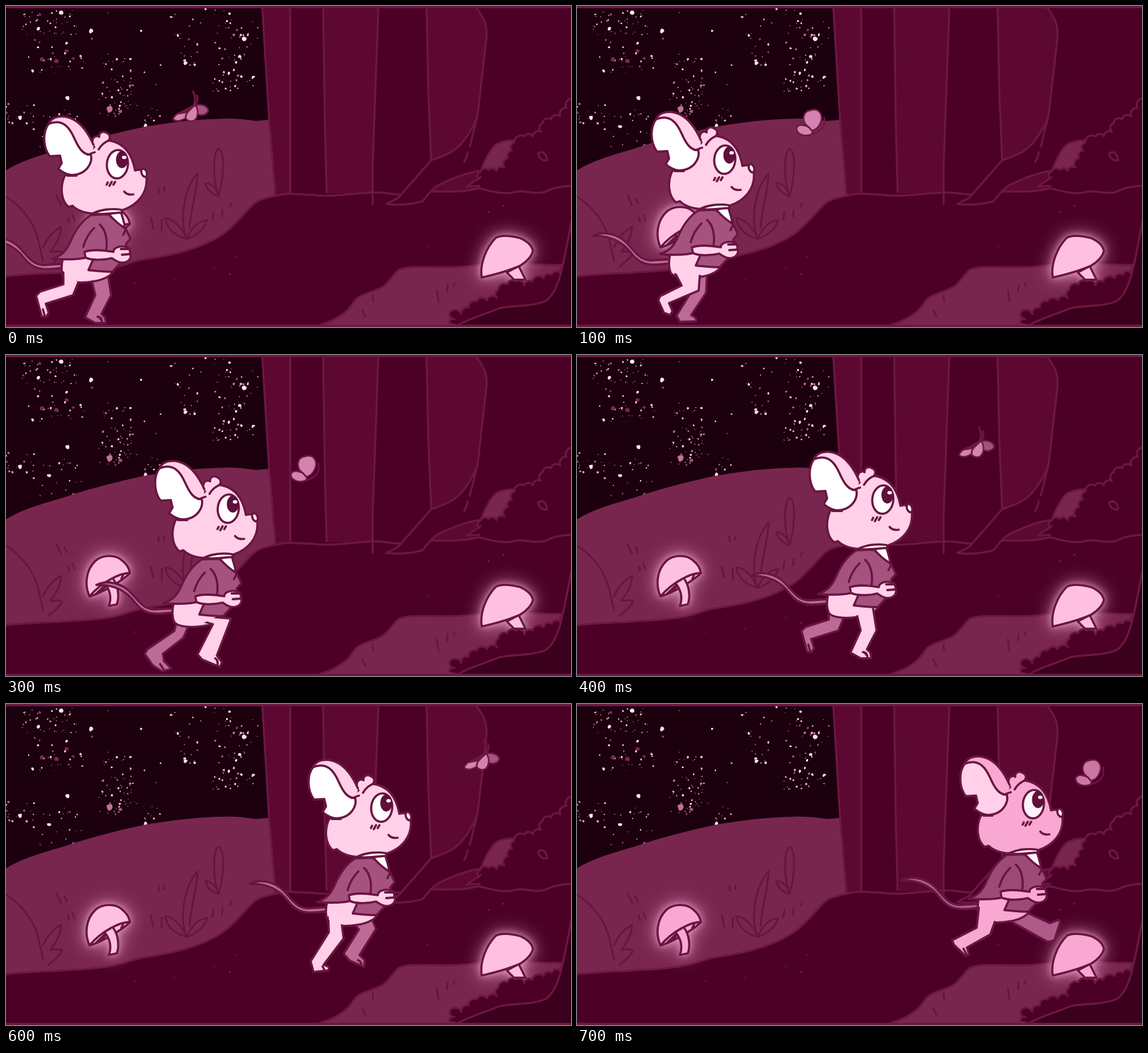
Recreate the animation shown at these times as an HTML page. Size 994 by 564 pixels, loop 0.8 s.

```html
<!DOCTYPE html>
<html lang="en">
<head>
<meta charset="utf-8">
<title>Night walk</title>
<style>
html, body { margin: 0; width: 100%; height: 100%; overflow: hidden; background: #4c0026; }
svg { display: block; width: 100vw; height: 100vh; stroke-linecap: round; stroke-linejoin: round; }
.edge { stroke: #6d1743; stroke-width: 3.5; fill: none; }
.grass { stroke: #65163f; stroke-width: 3.2; fill: none; }
.ink { stroke: #6a1541; stroke-width: 3.8; }
.fine { stroke: #6d1743; stroke-width: 2.8; }
.skin { fill: var(--skin); }
.ear { fill: var(--ear); }
.white { fill: var(--white); }
.coat { fill: var(--coat); }
.shade { fill: var(--shade); }
.cap { fill: var(--cap); }
.wing { fill: var(--wing); }
.none { fill: none; }
.glow { filter: drop-shadow(0 0 6px #ffb4dca0) drop-shadow(0 0 15px #ffb4dcb0); }
</style>
</head>
<body>
<svg id="stage" viewBox="0 0 994 564" preserveAspectRatio="none"></svg>
<script>
const stage = document.getElementById('stage');
const path = (d, cls, extra = '') => `<path class="${cls}" d="${d}" ${extra}/>`;
const fill = (d, color) => `<path d="${d}" fill="${color}"/>`;
const GROUND = '#4c0026', HILL = '#79264f', TRUNK = '#5c0830', LINE = '#6d1743';

function randomizer(seed) {
  return () => {
    seed = (seed * 1664525 + 1013904223) % 4294967296;
    return seed / 4294967296;
  };
}

function scallop(points) {
  let [x, y] = points[0];
  let d = `M${x},${y}`;
  for (const [nx, ny] of points.slice(1)) {
    const r = Math.hypot(nx - x, ny - y) * 0.58;
    d += `A${r.toFixed(1)},${r.toFixed(1)} 0 0 0 ${nx},${ny}`;
    [x, y] = [nx, ny];
  }
  return d;
}

function stars() {
  const rnd = randomizer(77);
  const tones = ['#fff0f8', '#ffd0e8', '#ffd0e8', '#ffb4d8', '#c2709c', '#8c3a66'];
  const speck = (x, y, r, color) => {
    let d = '';
    for (let i = 0; i < 7; i++) {
      const a = i / 7 * Math.PI * 2, q = r * (0.65 + rnd() * 0.6);
      d += (i ? 'L' : 'M') + (x + Math.cos(a) * q).toFixed(1) + ',' + (y + Math.sin(a) * q).toFixed(1);
    }
    return fill(d + 'Z', color);
  };
  // centre, half size and count of each cluster
  const clusters = [
    [80, 28, 52, 24, 42], [95, 88, 45, 26, 24], [195, 122, 30, 30, 32], [198, 172, 36, 22, 28],
    [28, 188, 30, 18, 18], [88, 215, 46, 34, 24], [322, 78, 20, 30, 16], [405, 52, 38, 26, 22],
    [400, 118, 38, 32, 40], [258, 194, 16, 16, 10], [350, 22, 60, 18, 14], [220, 100, 215, 95, 24]
  ];
  let out = '';
  for (const [cx, cy, sx, sy, n] of clusters) {
    for (let i = 0; i < n; i++) {
      const x = cx + (rnd() * 2 - 1) * sx, y = cy + (rnd() * 2 - 1) * sy;
      const r = 0.7 + rnd() ** 2 * 1.7, tone = tones[Math.floor(rnd() * tones.length)];
      if (x > 0 && x < 446 && y > 5) out += speck(x, y, r, tone);
    }
  }
  const bright = [[149, 44, 4], [57, 40, 3], [108, 162, 4], [25, 196, 4], [76, 212, 4], [419, 57, 4.5],
    [316, 100, 3.6], [411, 89, 3], [47, 114, 3], [392, 118, 3], [245, 210, 3], [97, 12, 3.5]];
  const faint = [[63, 94, 5], [89, 97, 4], [107, 79, 4], [118, 92, 3]];
  out += bright.map(s => speck(...s, '#ffe4f2')).join('');
  out += faint.map(s => speck(...s, HILL)).join('');
  return out + speck(182, 181, 6, '#c2709c') + speck(201, 185, 3, '#a5527f');
}

function woods() {
  const lines = [
    'M451,4L463,201L474,333', 'M500,4L500,329', 'M558,4L561,210L564,327',
    'M655,4L645,280L645,348', 'M740,4L743,150L748,271',
    'M828,4C843,24 847,36 845,58L830,190C824,212 806,240 790,252C776,263 762,265 748,271L690,337L669,348C690,350 712,349 733,343C742,332 748,322 762,314C782,305 805,294 832,290',
    'M829,195L816,247', 'M812,257C812,264 809,269 806,274',
    'M474,334C490,328 510,330 540,332C572,336 600,330 640,328C664,326 676,331 692,331',
    'M747,326C780,326 810,327 831,320C852,325 870,331 890,328C910,321 930,333 950,326C965,318 980,317 994,316',
    'M811,318C818,310 830,306 835,300M816,317L833,316'
  ];
  const bush = scallop([[996, 163], [986, 179], [975, 194], [959, 199], [944, 206], [941, 221], [927, 229],
    [912, 229], [894, 240], [890, 254], [883, 267], [877, 284], [863, 290], [849, 288], [835, 291], [832, 304]]);
  return fill('M451,4H500V330L474,334Z', TRUNK) + fill('M558,4H655L645,280V329H564Z', TRUNK) +
    fill('M740,4H828C843,24 847,36 845,58L830,190C824,212 806,240 790,252C776,263 762,265 748,271Z', TRUNK) +
    fill('M747,326C752,320 756,317 762,314C782,305 805,294 832,290L835,300C828,307 818,310 811,318L831,320C810,327 780,326 747,326Z', TRUNK) +
    path('M831,302C838,280 848,256 862,243C872,238 885,235 897,237L900,260L875,295Z', 'edge', `style="fill:${HILL}"`) +
    fill(bush + 'L850,316L994,314Z', GROUND) + path(bush, 'edge') +
    lines.map(d => path(d, 'edge')).join('') +
    path('M936,259C945,253 951,261 952,271C944,273 938,268 936,259Z', 'edge');
}

function leftHill() {
  const edge = 'C455,338 445,340 437,347C420,362 405,385 380,402C340,428 290,438 250,444C225,447 210,456 180,461C150,467 120,466 90,469C60,470 30,471 0,475';
  const plants = [
    'M0,335C28,352 48,380 56,408L65,448', 'M65,424C72,408 82,396 97,388C96,407 87,420 78,432C85,432 92,429 99,433C94,444 84,450 75,458',
    'M318,409C306,382 310,325 337,294C336,328 325,355 323,390',
    'M318,409C308,386 292,373 280,373C284,394 300,405 318,409C330,406 349,394 354,376C338,378 326,390 318,409',
    'M374,334C362,300 365,254 374,251C385,255 384,300 374,334C360,330 352,320 351,311C362,312 370,320 374,334',
    'M89,333L97,350M103,338L107,347M109,372L111,379M117,367L121,377M268,319L269,328M279,318L278,325',
    'M255,372L259,391M274,375V394M365,362L363,375M381,358L380,370M396,347L394,353'
  ];
  const top = 'M0,290C30,271 70,261 100,252C140,238 190,225 240,214C290,205 330,200 380,199C400,198 420,200 440,203L463,201L474,333';
  return path(top + edge + 'Z', '', `fill="${HILL}" stroke="${HILL}" stroke-width="2"`) +
    path('M463,201L474,333' + edge, 'edge') + plants.map(d => path(d, 'grass')).join('');
}

function rightHill() {
  const leaves = scallop([[975, 469], [960, 472], [946, 478], [926, 484], [912, 491], [897, 484], [882, 489],
    [866, 499], [864, 513], [846, 517], [828, 519], [814, 530], [801, 541], [781, 538], [789, 550], [780, 557]]);
  const top = 'M553,560C580,552 600,540 612,520C620,505 650,503 665,492C680,478 682,470 692,463C710,456 740,459 770,459C800,460 830,455 860,453L978,455';
  const corner = 'M797,560C815,549 845,541 868,531C892,526 930,528 950,518C972,503 979,465 996,372';
  return fill(top + 'L970,480L800,560Z', HILL) + path(top, 'edge') +
    path('M645,508L646,519M627,535L632,546M758,499L761,520M777,490L776,502M789,487L788,492', 'grass') +
    `<g class="glow">${path('M881,468L894,481L914,481L902,457Z', 'ink cap')}` +
    path('M837,477C833,453 845,424 862,407C872,402 890,404 905,408C916,413 925,421 927,430C925,440 915,450 905,456C885,465 855,473 837,477Z', 'ink cap') + '</g>' +
    fill(leaves + 'L797,560L965,510L978,460Z', GROUND) + path(leaves, 'edge') +
    fill(corner + 'V560Z', '#3a001c') + path(corner, 'edge') + path('M978,455L973,468', 'edge');
}

function leftMushroom() {
  return '<g class="glow">' +
    path('M147,424C165,420 206,396 218,383L190,382L150,412Z', 'ink cap') +
    path('M158,420L178,401M167,415L184,398M203,393L206,387', 'ink none') +
    path('M174,402C182,412 187,424 181,441L195,438C200,424 197,405 189,394', 'ink cap') +
    path('M147,424C138,405 140,378 157,362C170,350 192,351 203,360C212,367 217,375 218,383C200,383 168,399 147,424Z', 'ink cap') + '</g>';
}

function mouse() {
  const line = d => path(d, 'ink none');
  return path('M-36,412C-20,404 0,407 16,418C34,431 42,455 66,455L100,453V460C60,466 46,461 32,443C18,424 -2,411 -36,412Z', 'ink shade') +
    '<path id="farLeg" class="ink shade"/>' +
    path('M100,443C97,456 97,468 101,477C108,487 135,487 152,484C170,482 186,474 189,465L150,440Z', 'ink skin') +
    '<path id="nearLeg" class="ink skin"/>' +
    fill('M102,446L103,475C118,483 140,482 152,479L175,468L150,440Z', 'var(--skin)') +
    path('M150,367L180,366L211,392L219,409L211,418L214,440L198,455L187,467C170,467 155,465 145,464L153,446L150,440C130,446 105,446 82,444C99,438 106,430 113,415C120,398 132,378 150,367Z', 'ink coat') +
    line('M155,390C146,399 139,412 136,423M165,384C176,394 179,412 176,430M211,392L206,402') +
    path('M138,432C152,427 172,429 189,432C189,424 202,420 214,424C220,428 217,432 219,436C221,444 215,451 203,451C195,450 190,445 186,443C170,447 150,447 140,442Z', 'ink skin') +
    line('M202,427H216M204,437L218,436') +
    path('M181,366L202,361C205,373 209,382 209,390C197,383 189,375 181,366Z', 'ink white') +
    path('M104,297C94,318 97,342 110,353L117,351C130,364 155,367 172,363L204,359C232,350 250,328 247,300C244,289 238,286 227,289C222,260 208,240 180,236C163,238 152,248 148,258L120,297Z', 'ink skin') +
    path('M152,365C165,358 185,355 203,358L205,363C190,363 172,367 152,365Z', 'ink white') +
    path('M153,244C149,232 158,226 164,230C163,222 171,219 177,223C184,226 184,232 180,237L163,252Z', 'skin') +
    line('M153,244C149,232 158,226 164,230C163,222 171,219 177,223C184,226 184,232 180,237M163,252C168,243 175,238 184,235') +
    path('M75,207C80,194 100,190 118,199C135,208 147,228 154,244L153,257C145,264 137,262 131,253C120,236 112,203 75,207Z', 'skin') +
    path('M75,207C100,197 112,214 120,232C128,250 136,262 149,261C154,275 141,297 115,297C105,296 98,291 92,286L98,276L95,263L77,264C64,247 65,220 75,207Z', 'ink ear') +
    line('M75,207C80,194 100,190 118,199C135,208 147,228 154,244M143,261C147,262 150,258 156,257M108,298H124') +
    '<ellipse class="ink white" cx="196" cy="278" rx="18.5" ry="25" transform="rotate(5 196 278)"/>' +
    '<ellipse cx="204" cy="270" rx="10.5" ry="15" fill="#5f0f39"/><ellipse class="white" cx="208" cy="266" rx="4" ry="3"/>' +
    '<ellipse class="ink white" cx="243" cy="293" rx="4.5" ry="7.5" transform="rotate(-20 243 293)"/>' +
    line('M179,310L177,314M186,309L182,316M192,309L189,314M208,326C212,331 218,332 224,331');
}

function moth() {
  const wing = (d, color = 'wing') => path(d, 'fine ' + color);
  return '<g id="mothOpen">' +
    wing('M334,174C345,172 355,176 356,184C353,192 342,194 336,189Z', 'coat') +
    wing('M326,180C310,186 297,188 294,199C300,205 314,201 322,191Z') +
    wing('M333,174C321,182 312,193 318,200C327,206 336,201 337,190C338,182 336,178 333,174Z') +
    path('M304,189L333,173L320,186Z', 'fine', `fill="${LINE}"`) +
    path('M329,150C334,160 333,166 331,172M336,157C338,163 337,168 334,172', 'edge') +
    '</g><g id="mothShut">' +
    path('M522,221C536,220 547,212 550,203V191', 'fine none') +
    wing('M530,214C520,202 502,201 501,211C503,222 518,225 528,220Z') +
    wing('M523,208C509,199 511,180 526,178C543,173 549,189 543,201C540,208 534,213 528,214Z') + '</g>';
}

const dots = [[367, 461], [394, 471], [405, 441], [296, 481], [875, 351], [849, 362], [741, 423], [227, 487]];
const rect = (y, h, color) => `<rect y="${y}" width="994" height="${h}" fill="${color}"/>`;
stage.innerHTML = rect(0, 564, GROUND) +
  '<rect width="474" height="330" fill="#1c000e"/>' + stars() + woods() + leftHill() +
  dots.map(([x, y], i) => `<circle cx="${x}" cy="${y}" r="${i % 4 === 1 || i === 4 ? 2 : 1.4}" fill="${LINE}"/>`).join('') +
  leftMushroom() + rightHill() + `<g id="mouse">${mouse()}</g>` + moth() +
  rect(0, 4, LINE) + rect(560, 4, LINE);

// leg outlines from rear hip round the foot to front hip, then a toe line
const LEGS = {
  trail: 'M101,468L101,489L60,502L53,509L63,546L71,546L75,539L70,523L118,508L127,486M65,533L68,544',
  land: 'M151,483L157,508L139,547L157,557L176,557L174,547L168,541L185,508L179,470M161,546C167,546 169,551 169,556',
  stand: 'M133,482L134,515L111,552L117,563L146,562L145,556L137,551L163,512L165,477',
  pass: 'M109,478L120,499L82,518L79,525L89,547L100,551L104,544L98,530L150,508L152,482',
  push: 'M102,471L103,497L71,548L76,567L103,564L103,558L94,554L129,508L126,485M92,557L95,563',
  pushLow: 'M104,473L105,506L71,559L77,578L106,578L103,570L95,566L130,512L130,485',
  lift: 'M146,481L156,492L129,535L140,547L165,558L166,546L157,537L186,491L178,472M154,546C159,547 160,551 160,555',
  back: 'M101,468L104,482L101,493L54,525L49,533L63,553L80,564L96,559L83,546L81,533L117,505L125,486M76,551L82,560',
  bend: 'M145,474L169,481L142,534L150,543L181,556L185,548L176,536L201,471L155,467M173,541C177,543 178,548 177,553',
  kickBack: 'M100,460L96,495L53,517L56,525L77,545L83,542L79,530L120,507L128,485M73,532L78,541',
  kick: 'M153,482L221,520L233,517L243,485L241,481L225,487L183,468'
};

// mouse x, y, near leg, far leg, moth x, y
const STEPS = [
  [0, 0, 'trail', 'land', 0, 0],
  [64, -8, 'pass', 'stand', -115, 5],
  [128, -16, 'lift', 'pushLow', 166, -30],
  [195, -8, 'bend', 'back', 0, 0],
  [342, -24, 'land', 'trail', 378, -23],
  [403, -60, 'stand', 'pass', 250, -48],
  [465, -96, 'push', 'lift', 512, -87],
  [607, -102, 'kickBack', 'kick', 376, -79]
];
const NORMAL = { skin: '#ffd0e8', ear: '#fff', white: '#fff', coat: '#a5527f', shade: '#bd6a97', cap: '#ffc0e0', wing: '#d482ae' };
const DEEP = { skin: '#f9a8d2', ear: '#ffd0e8', white: '#fff2f9', coat: '#9d4a78', shade: '#b05a8a', cap: '#f9a8d2', wing: '#cb76a4' };

const part = id => document.getElementById(id);
const [hero, near, far, open, shut] = ['mouse', 'nearLeg', 'farLeg', 'mothOpen', 'mothShut'].map(part);

function draw(now) {
  const step = Math.floor(now % 800 / 100);
  const [x, y, nearPose, farPose, mx, my] = STEPS[step];
  hero.setAttribute('transform', `translate(${x} ${y})`);
  near.setAttribute('d', LEGS[nearPose]);
  far.setAttribute('d', LEGS[farPose]);
  const [shown, hidden] = step % 2 ? [shut, open] : [open, shut];
  shown.setAttribute('transform', `translate(${mx} ${my})`);
  shown.setAttribute('display', 'inline');
  hidden.setAttribute('display', 'none');
  const palette = step === 7 ? DEEP : NORMAL;
  for (const name in palette) stage.style.setProperty('--' + name, palette[name]);
}

const start = performance.now();
function tick() {
  draw(performance.now() - start);
  requestAnimationFrame(tick);
}
tick();
</script>
</body>
</html>
```
